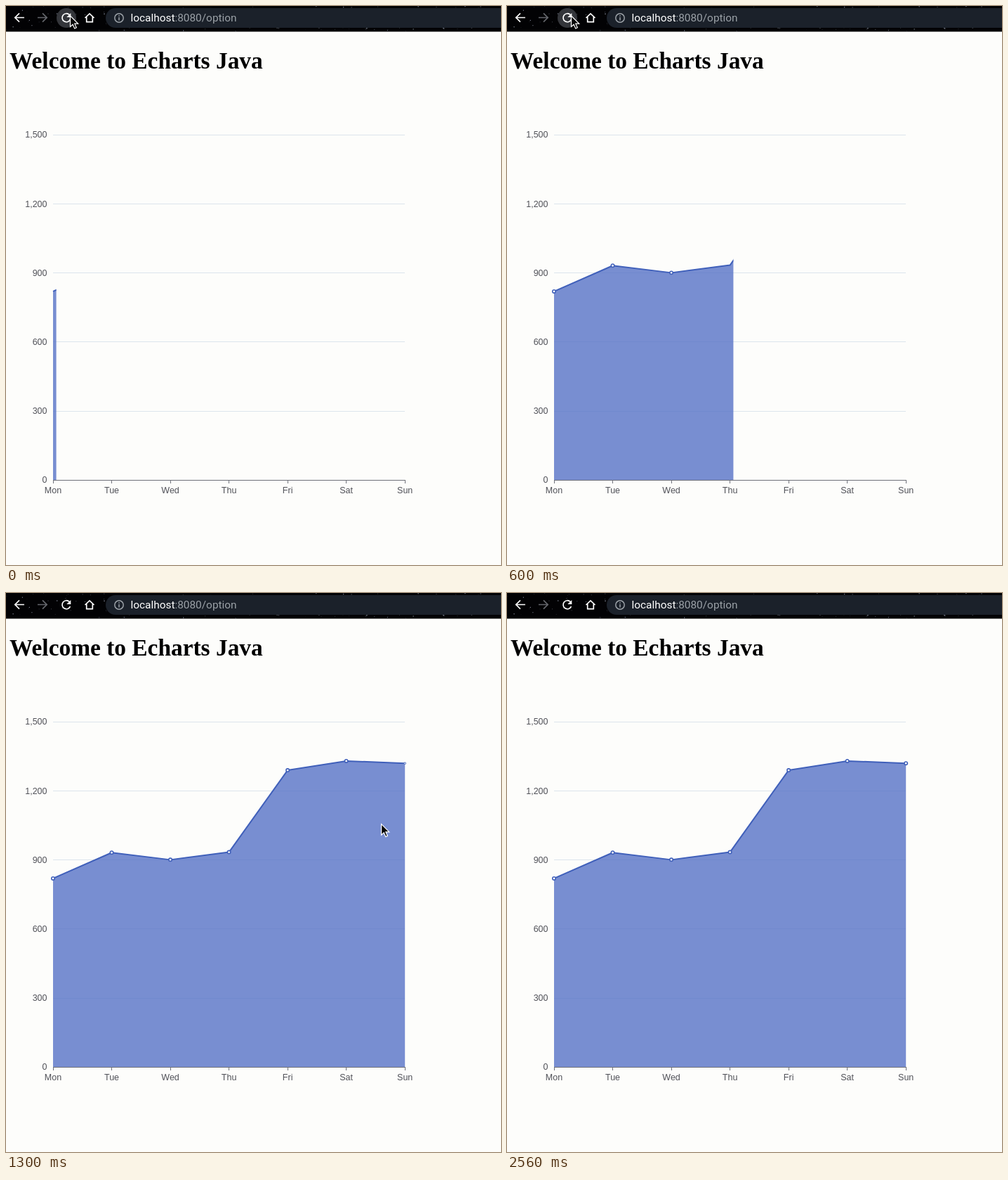
An HTML page that plays this animation: 705 px wide and 795 px high, repeating every 2580 ms.

```html
<!DOCTYPE html>
<html lang="en">
<head>
<meta charset="utf-8">
<title>Echarts Java</title>
<style>
  html, body { margin: 0; height: 100%; overflow: hidden; background: #fdfdfb; }
  svg { display: block; }
  .labels { font: 12.5px "Liberation Sans", Arial, sans-serif; fill: #505158; }
  .icon { fill: none; stroke: #fff; stroke-width: 1.7; }
</style>
</head>
<body>
<svg width="705" height="795" viewBox="0 0 705 795">
  <defs><clipPath id="reveal"><rect id="wipe" x="60" y="100" height="600"/></clipPath></defs>

  <rect width="705" height="36.5" fill="#020204"/>
  <g id="stars"></g>
  <path d="M705 3H156a14 14 0 0 0 0 28H705Z" fill="#1b212a"/>
  <circle id="hover" cx="86" cy="17" r="14" fill="#34363b"/>
  <path class="icon" d="M26 16.500H13M19 10.300L12.800 16.500L19 22.700"/>
  <path class="icon" d="M45 16.500H58M52 10.300L58.200 16.500L52 22.700" style="stroke:#64666b"/>
  <path class="icon" d="M91.500 19.200A6 6 0 1 1 90.300 12.500"/>
  <path d="M92.300 10V16H86.300Z" fill="#fff"/>
  <path class="icon" d="M112.500 17L119 10.800L125.500 17M114.700 15.500V22.700H123.300V15.500"/>
  <g stroke="#9aa0a6" stroke-width="1.500" fill="none">
    <circle cx="161" cy="17" r="6.200"/>
    <path d="M161 16V20.500M161 13.200V14.800"/>
  </g>
  <text x="177.500" y="22" font-family="Roboto, sans-serif" font-size="15.400" fill="#9aa0a6"><tspan fill="#fff">localhost</tspan>:8080/option</text>

  <text x="5" y="89.300" font-family="'Liberation Serif', Times, serif" font-weight="bold" font-size="33.400">Welcome to Echarts Java</text>

  <g id="grid" stroke="#dce5ec"></g>
  <g clip-path="url(#reveal)">
    <path id="area" fill="#5470c6" fill-opacity=".78"/>
    <path id="line" fill="none" stroke="#4060ba" stroke-width="2" stroke-linejoin="bevel"/>
  </g>
  <path id="axis" fill="none" stroke="#6e7079"/>
  <g id="labels" class="labels"></g>
  <g id="dots" fill="#fff" stroke="#4060ba" stroke-width="1.600"></g>
  <path id="cursor" d="M0 0V15.500L3.600 12.200L6.200 18L8.800 16.800L6.300 11.200H11.200Z" fill="#050505" stroke="#fff" stroke-width="1.200"/>
</svg>
<script>
const LOOP = 2580, LEFT = 67, STEP = 83.53, BASE = 674.3, SCALE = 98.2 / 300;
const SPEED = 0.418, START = 71.2;
const days = ['Mon', 'Tue', 'Wed', 'Thu', 'Fri', 'Sat', 'Sun'];
const values = [820, 932, 901, 934, 1290, 1330, 1320];
const $ = id => document.getElementById(id);
const xOf = i => LEFT + i * STEP;
const yOf = v => BASE - v * SCALE;

function add(parent, tag, attrs, text = '') {
  const el = document.createElementNS('http://www.w3.org/2000/svg', tag);
  for (const key in attrs) el.setAttribute(key, attrs[key]);
  el.textContent = text;
  return $(parent).appendChild(el);
}

let seed = 7;
const random = () => (seed = seed * 16807 % 2147483647) / 2147483647;
for (let i = 0; i < 190; i++) {
  add('stars', 'circle', {
    cx: random() * 705, cy: random() * 36, r: 0.3 + random() * 0.5,
    fill: '#b4bdd2', opacity: 0.2 + random() * 0.6
  });
}

for (let v = 0; v <= 1500; v += 300) {
  const y = yOf(v);
  if (v) add('grid', 'path', { d: `M${LEFT} ${Math.floor(y) + 0.5}H568` });
  add('labels', 'text', { x: 58.5, y: y + 4.1, 'text-anchor': 'end' }, v.toLocaleString('en-US'));
}

let ticks = `M${LEFT} 674.5H568.5`;
days.forEach((day, i) => {
  ticks += `M${Math.floor(xOf(i)) + 0.5} 674V679`;
  add('labels', 'text', { x: xOf(i), y: 692.7, 'text-anchor': 'middle' }, day);
});
$('axis').setAttribute('d', ticks);

const points = values.map((v, i) => `${xOf(i)} ${yOf(v)}`).join('L');
$('line').setAttribute('d', `M${points}`);
$('area').setAttribute('d', `M${LEFT} ${BASE}L${points}V${BASE}Z`);
const dots = values.map(() => add('dots', 'circle', { r: 2.2 }));

function draw(t) {
  $('wipe').setAttribute('width', Math.min(START + SPEED * t, 600) - 60);

  // Each dot pops up shortly after the wipe has passed it.
  dots.forEach((dot, i) => {
    const passed = (xOf(i) - START) / SPEED + 60;
    const p = Math.min(1, Math.max(0, (t - passed) / 200));
    const size = 1 - (1 - p) ** 3;
    dot.setAttribute('transform', `translate(${xOf(i)} ${yOf(values[i])}) scale(${size})`);
  });

  // The pointer rests on reload, then speeds away to the lower right.
  const move = 24 * Math.max(0, (t - 980) / 100) ** 2.5;
  $('cursor').setAttribute('transform', `translate(${91.5 + move} ${14 + move * 0.71})`);
  $('cursor').style.display = move > 620 ? 'none' : '';
  $('hover').style.opacity = Math.min(1, Math.max(0, (1180 - t) / 150));
}

function tick() {
  draw(performance.now() % LOOP);
  requestAnimationFrame(tick);
}
tick();
</script>
</body>
</html>
```
